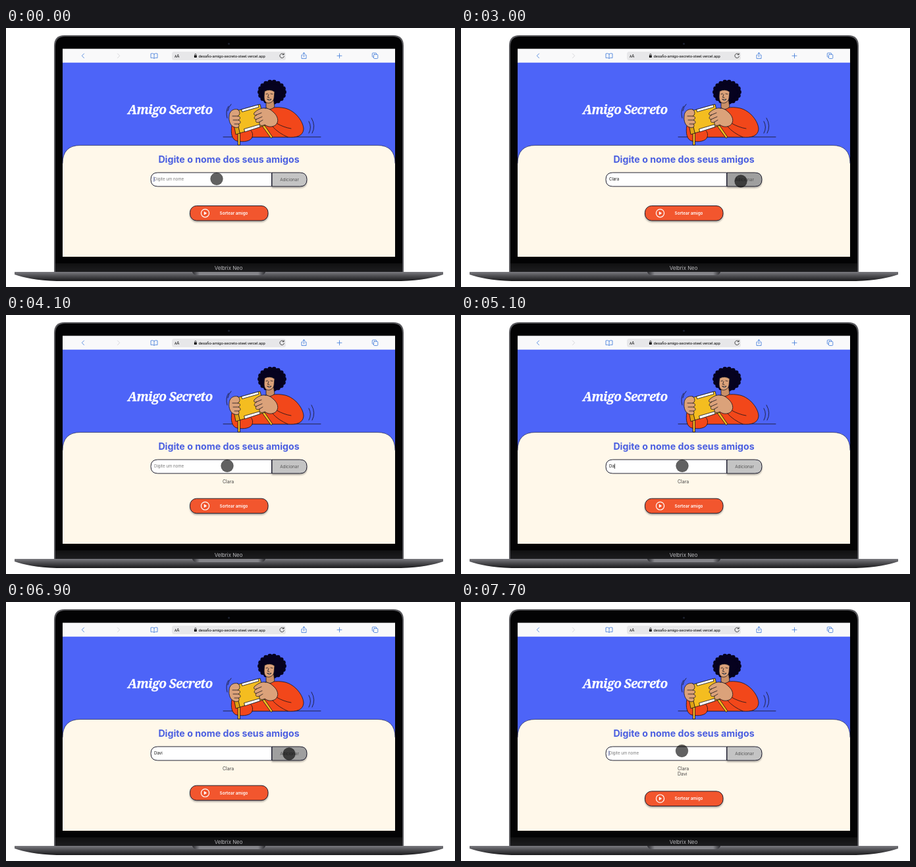
Write an HTML page that moves like this. It is 682 by 394 pixels and loops after 8000 ms.

```html
<!DOCTYPE html>
<html lang="pt-BR">
<head>
<meta charset="utf-8">
<title>Amigo Secreto</title>
<style>
html, body { margin: 0; height: 100%; overflow: hidden; background: #fff; }
svg { display: block; width: 682px; height: 394px; }
text { font-family: Inter, "Open Sans", sans-serif; }
.title { font: italic 700 19px "Noto Serif", serif; letter-spacing: -.75px; stroke: #fff; stroke-width: .25; }
.url { font: 5.9px Roboto, sans-serif; }
.icon { fill: none; stroke: #3976d8; stroke-width: .8; stroke-linecap: round; stroke-linejoin: round; }
.ink { stroke: #17131c; stroke-width: .8; stroke-linejoin: round; stroke-linecap: round; }
.line { fill: none; }
.box { stroke: #161628; stroke-width: .95; }
</style>
</head>
<body>
<svg viewBox="0 0 682 394">
  <defs>
    <linearGradient id="base" x1="0" y1="0" x2="0" y2="1">
      <stop offset="0" stop-color="#7b7b80"/><stop offset=".35" stop-color="#56565a"/>
      <stop offset="1" stop-color="#19191b"/>
    </linearGradient>
    <linearGradient id="notch">
      <stop offset="0" stop-color="#29292d"/><stop offset=".1" stop-color="#85858a"/>
      <stop offset=".9" stop-color="#85858a"/><stop offset="1" stop-color="#29292d"/>
    </linearGradient>
    <linearGradient id="hinge" x1="0" y1="0" x2="0" y2="1">
      <stop offset="0" stop-color="#101011"/><stop offset="1" stop-color="#1d1d1f"/>
    </linearGradient>
    <filter id="shade" x="-10%" y="-20%" width="120%" height="170%">
      <feDropShadow dx="0" dy="2" stdDeviation="1" flood-opacity=".3"/>
    </filter>
  </defs>

  <!-- laptop -->
  <path d="M73 371V27Q73 11 89 11H588Q604 11 604 27V371Z" fill="#58585c"/>
  <path d="M75 371V28Q75 13 90 13H587Q602 13 602 28V371Z" fill="#030304"/>
  <rect x="75" y="358" width="527" height="13" fill="url(#hinge)"/>
  <text x="338" y="367.6" font-size="7.8" fill="#b9b9bc" text-anchor="middle">Velbrix Neo</text>
  <path d="M13 371H664V375C650 380 630 384 600 385H77C47 384 27 380 13 375Z" fill="url(#base)"/>
  <path d="M283 371H394Q393 376 386 376H291Q284 376 283 371Z" fill="url(#notch)"/>
  <circle cx="338.5" cy="24" r="1.5" fill="#1d2230"/>

  <!-- browser bar -->
  <rect x="86" y="31.6" width="505" height="22" fill="#f9f9fa"/>
  <rect x="252" y="36" width="173" height="13" rx="3.5" fill="#e7e7e9"/>
  <text x="256" y="44.5" font-size="4.8">A<tspan font-size="5.9">A</tspan></text>
  <rect x="285.9" y="41.6" width="3.8" height="3.4" rx=".6"/>
  <path d="M286.7 41.6V40.4a1.1 1.1 0 0 1 2.2 0V41.6" fill="none" stroke="#000" stroke-width=".6"/>
  <text class="url" x="292.5" y="44.5">desafio-amigo-secreto-steel.vercel.app</text>
  <path d="M421.8 40.2A3.3 3.3 0 1 0 422.5 42.8M422.2 38.3V40.6H419.8" fill="none" stroke="#222" stroke-width=".8"/>
  <g class="icon">
    <path d="M118.5 39 115.3 42.3 118.5 45.6"/>
    <path d="M169.5 39 172.7 42.3 169.5 45.6" stroke="#d0d0d4"/>
    <path d="M225 39.5Q222.5 38 220 39V45.5Q222.5 44.8 225 46.2Q227.5 44.8 230 45.5V39Q227.5 38 225 39.5V46"/>
    <path d="M450.5 41H449V46.5H456V41H454.5M452.5 44V37.5M450.7 39.2 452.5 37.5 454.3 39.2"/>
    <path d="M503 42.3H510M506.5 38.8V45.8"/>
    <rect x="558.5" y="40.2" width="6.3" height="6.3" rx="1.1"/>
    <path d="M558.5 44.3H557.4Q556.3 44.3 556.3 43.2V39.1Q556.3 38 557.4 38H561.5Q562.6 38 562.6 39.1V40.2"/>
  </g>

  <!-- page -->
  <rect x="86" y="52.7" width="505" height="295.3" fill="#4d64f8"/>
  <path d="M86 348V206Q86 178.5 113 178.5H564Q591 178.5 591 206V348Z" fill="#fff8ea"/>
  <path d="M86 206Q86 178.5 113 178.5H564Q591 178.5 591 206" fill="none" stroke="#20264f" stroke-width=".7"/>
  <text class="title" x="249.2" y="130.5" text-anchor="middle" fill="#fff">Amigo Secreto</text>
  <text x="338.5" y="204.6" font-size="14.2" font-weight="700" text-anchor="middle" fill="#4b5fe0">Digite o nome dos seus amigos</text>

  <!-- woman shaking a box -->
  <g class="ink">
    <path class="line" d="M330 165.8H478"/>
    <path d="M386 130C394 121 411 119 424 122C440 126 452 143 452 154C451 165 440 167 428 166H374C372 172 362 174 351 172C343 170 341 160 343 148L357 144L386 148Z" fill="#f2471a"/>
    <path class="line" d="M428 166C419 162 411 157 405 150M411 145C418 149 426 152 433 153M374 166Q376 160 372 156"/>
    <path d="M392 147 405 166 402.5 167.5 389 149Z" fill="#f4bd20"/>
    <path d="M352.5 158H355.5V178H352.5Z" fill="#f4bd20"/>
    <g id="hair" fill="#06021f" stroke="none"></g>
    <path d="M395 110V121Q400 127 408 120L406 106Z" fill="#c98f66"/>
    <path d="M393 96C392 102 391 110 395 113C399 116 406 113 407 107L408 97Q401 92 393 96Z" fill="#dba27a"/>
    <path class="line" d="M395 100.5 397.5 100M402 100 405 100.5M399 101 397.5 105.5 400 106"/>
    <path d="M397 108.5Q400 110 403 108Q401 112.5 397 108.5Z" fill="#fff"/>
    <path d="M347 127 386 116 394 148 355 160Z" fill="#f4bd20"/>
    <path d="M347 127 343 131 349 162 355 160Z" fill="#dfa313"/>
    <path d="M358 123.8 383 116.8 384 120.4 359 127.5ZM362 153.5 385 146.8 386 150.5 363 158Z" fill="#fff"/>
    <path d="M352 124C345 122 339 127 339 134C338 142 341 149 347 151C352 153 356 150 353 146C357 146 357 141 353 140C357 138 356 134 352 134C356 132 356 127 352 124Z" fill="#dba27a"/>
    <path d="M394 122C388 121 383 124 378 128C375 131 377 134 381 132C376 135 376 139 380 139C378 143 381 145 385 143C384 148 388 150 393 147C398 151 404 151 409 148C416 142 412 133 406 128C402 124 398 122 394 122Z" fill="#dba27a"/>
    <path class="line" d="M381 132 388 129M380 139 389 135M385 143 390 140M344 134 352 134M345 140 353 140M347 146 353 146"/>
    <path class="line" d="M338 119Q333 126 336 137M342 116Q338 120 337 126M460 142Q465 151 460 160M464 137Q471 149 465 160"/>
  </g>

  <!-- form -->
  <path d="M404 220H446.5Q457 220 457 230.5T446.5 241H404Z" id="add" class="box" filter="url(#shade)"/>
  <text x="430.5" y="232.7" font-size="6.4" text-anchor="middle" fill="#555">Adicionar</text>
  <path d="M403.5 220H230.5Q220 220 220 230.5T230.5 241H403.5Z" class="box" fill="#fff"/>
  <text id="field" x="225" y="232.4" font-size="6.1"></text>
  <rect id="caret" y="226.3" width=".8" height="7.6"/>
  <g font-size="7" fill="#444">
    <text id="first" x="329" y="255.6">Clara</text>
    <text id="second" x="329" y="264.4">Davi</text>
  </g>
  <g id="draw">
    <rect x="279.5" y="270.5" width="118.5" height="22.5" rx="10" class="box" fill="#f2572e" filter="url(#shade)"/>
    <circle cx="302.5" cy="281.7" r="6.1" fill="none" stroke="#fff" stroke-width="1.2"/>
    <path d="M300.8 278.9V284.5L305.2 281.7Z" fill="#fff"/>
    <text x="346" y="284" font-size="6.3" font-weight="600" text-anchor="middle" fill="#fff">Sortear amigo</text>
  </g>
  <circle id="pointer" r="9.4" fill-opacity=".62" stroke="#000" stroke-opacity=".25"/>
</svg>
<script>
const $ = id => document.getElementById(id);
const LOOP = 8000, STEP = 100;

// [time, x, y]
const path = [
  [0, 320, 229.5], [2300, 320, 229.5], [2400, 337, 233], [2500, 337, 233],
  [2800, 420, 233], [3000, 425, 233], [3100, 425, 233], [3300, 349.5, 226],
  [3600, 336, 229.5], [6300, 336, 229.5], [6400, 357, 229], [6600, 357, 229],
  [6900, 430, 231], [7000, 430, 231], [7200, 355, 227], [7500, 335.5, 226.5], [LOOP, 335.5, 226.5]
];
const entries = [
  { name: "Clara", keys: [800, 1100, 1500, 1700, 1700], sent: 3100 },
  { name: "Davi", keys: [4700, 5100, 5300, 5700], sent: 7000 }
];
const caretOn = [[0, 300], [800, 2100], [3600, 4100], [4700, 6100], [7600, LOOP]];

let curls = '<ellipse cx="404" cy="98" rx="20" ry="17.5"/>';
for (let i = 0; i < 18; i++) {
  const a = i * Math.PI / 9;
  curls += `<circle cx="${404 + 18.5 * Math.cos(a)}" cy="${97.5 + 15.5 * Math.sin(a)}" r="3.4"/>`;
}
$("hair").innerHTML = curls;

function pointerAt(t) {
  const i = path.findIndex(p => p[0] > t);
  const [t0, x0, y0] = path[i - 1], [t1, x1, y1] = path[i];
  const k = (t - t0) / (t1 - t0);
  return [x0 + (x1 - x0) * k, y0 + (y1 - y0) * k];
}

function typedAt(t) {
  const entry = entries.find(e => t >= e.keys[0] && t < e.sent);
  return entry ? entry.name.slice(0, entry.keys.filter(k => k <= t).length) : "";
}

function render(t) {
  const [x, y] = pointerAt(t), typed = typedAt(t);
  $("pointer").setAttribute("cx", x);
  $("pointer").setAttribute("cy", y);
  $("add").setAttribute("fill", x > 404 ? "#9f9f9f" : "#c4c4c4");

  const field = $("field");
  field.textContent = typed || "Digite um nome";
  field.setAttribute("fill", typed ? "#111" : "#777");
  $("caret").setAttribute("x", typed ? 225.3 + field.getComputedTextLength() : 224.5);
  $("caret").setAttribute("fill", typed ? "#222" : "#34408f");
  $("caret").style.opacity = +caretOn.some(([a, b]) => t >= a && t < b);

  const count = entries.filter(e => t >= e.sent).length;
  $("first").style.opacity = +(count > 0);
  $("second").style.opacity = +(count > 1);
  $("draw").setAttribute("transform", `translate(0 ${count * 8.7})`);
}

const start = performance.now();
function tick() {
  const t = (performance.now() - start) % LOOP;
  render(Math.floor(t / STEP) * STEP);
  requestAnimationFrame(tick);
}
tick();
</script>
</body>
</html>
```
